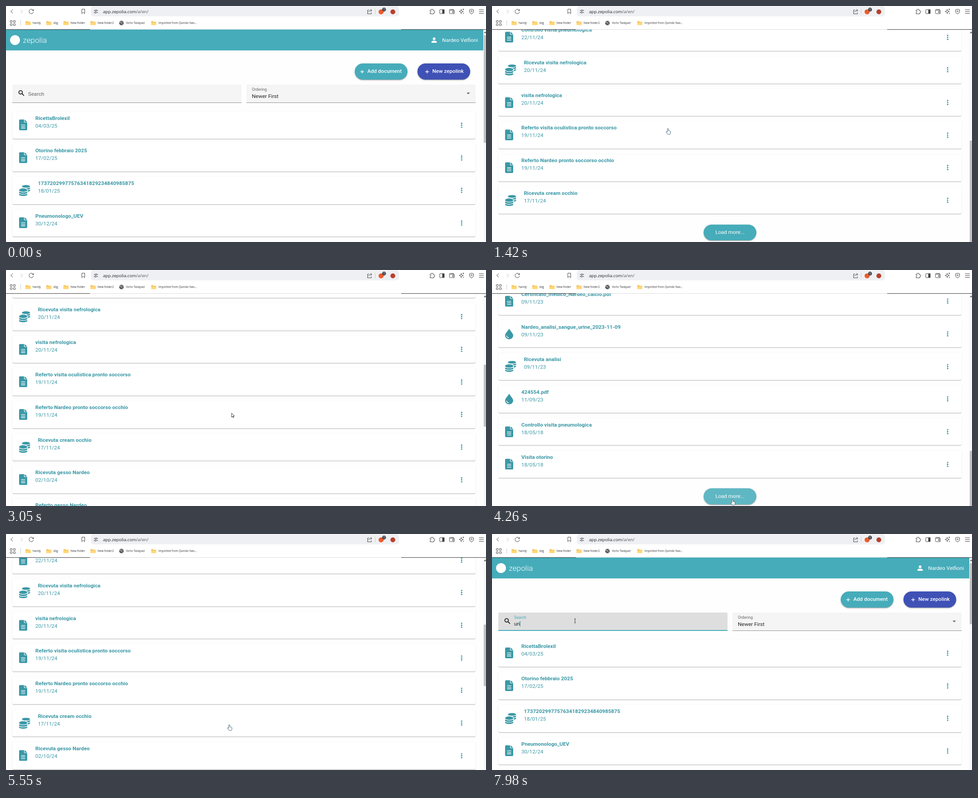
Animation, 1064 px wide and 526 px high, one loop 8000 ms. Source, as an HTML page:

```html
<!DOCTYPE html>
<html lang="en">
<head>
<meta charset="utf-8">
<style>
  html, body { margin: 0; width: 100%; height: 100%; overflow: hidden; background: #fff; }
  #stage { position: relative; width: 1064px; height: 526px; overflow: hidden; font: 11.63px/16px Roboto, sans-serif; }
  #stage * { position: absolute; box-sizing: border-box; white-space: nowrap; }
  #stage svg * { position: static; }
  #view { left: 0; top: 52px; width: 1058px; height: 474px; overflow: hidden; background: #fefefe; }
  #page { left: 0; top: -52px; width: 1058px; height: 2000px; }
  #header { top: 52px; width: 1058px; height: 47px; background: #46acba; color: #fff; }
  .card { left: 14px; width: 1027px; height: 61px; border-radius: 3px; background: #fff; color: #3b98a6;
    box-shadow: 0 1.45px .73px -.73px rgba(0,0,0,.2), 0 .73px .73px rgba(0,0,0,.14), 0 .73px 2.2px rgba(0,0,0,.12); }
  .card b { top: 6.4px; }
  .card span { top: 23.4px; }
  .card .icon { left: 14.5px; top: 18.2px; }
  .card .dots { left: 993px; top: 23.7px; }
  .pill { height: 35.5px; width: 117px; border-radius: 18px; line-height: 35.5px; background: #46acba; color: #fff; font-weight: 500;
    box-shadow: 0 2px 1.5px -1px rgba(0,0,0,.2), 0 1.5px 2px rgba(0,0,0,.14), 0 1px 4px rgba(0,0,0,.12); }
  .pill span { left: 28.5px; }
  .pill svg { left: 12px; top: 13.5px; }
  .field { top: 175px; width: 507.5px; height: 40.5px; border-radius: 3px 3px 0 0; background: #f5f5f5; border-bottom: 1px solid #8c8c8c; color: #222; }
  .small { font-size: 8.72px; color: #666; }
  #caret { width: 1px; height: 12px; top: 18.5px; background: #3b98a6; }
  #thumb { left: 1059px; width: 5px; background: #c1c1c1; }
</style>
</head>
<body>
<div id="stage">
  <div id="view"><div id="page">
    <div id="header">
      <svg width="30" height="30" style="left:5px;top:9px"><circle cx="15" cy="15" r="11" fill="#fff"/></svg>
      <span style="left:37.5px;top:14px;font-size:17.2px;line-height:20px;font-weight:300">zepolia</span>
      <svg width="14" height="14" style="left:942px;top:17px" fill="#fff"><circle cx="7" cy="4" r="3"/><path d="M1 13V11.2Q1.5 8.2 7 8.2T13 11.2V13Z"/></svg>
      <span style="right:12px;top:16px">Nardeo Velfioni</span>
    </div>
    <div class="pill" style="left:772.5px;top:128px"><svg width="9" height="9"><path d="M4.5 .5V8.5M.5 4.5H8.5" stroke="#fff" stroke-width="1.3"/></svg><span>Add document</span></div>
    <div class="pill" style="left:912px;top:128px;background:#3f51b5"><svg width="9" height="9" style="left:16.5px"><path d="M4.5 .5V8.5M.5 4.5H8.5" stroke="#fff" stroke-width="1.3"/></svg><span style="left:33px">New zepolink</span></div>
    <div class="field" id="search" style="left:14px">
      <svg width="16" height="16" style="left:13px;top:12px" fill="none" stroke="#111" stroke-width="1.7"><circle cx="5.4" cy="5.4" r="3.9"/><path d="M8.2 8.2 13 13"/></svg>
      <span id="label" style="left:35px">Search</span>
      <span id="typed" style="left:35px;top:17px"></span>
      <i id="caret"></i>
    </div>
    <div class="field" style="left:533px">
      <span class="small" style="left:12px;top:3px">Ordering</span>
      <span style="left:12px;top:18px">Newer First</span>
      <svg width="8" height="5" style="left:488px;top:18px"><path d="M0 0H7.4L3.7 3.8Z" fill="#666"/></svg>
    </div>
    <div id="rows"></div>
    <div class="pill" id="more" style="left:469px;text-align:center;font-weight:400">Load more...</div>
  </div></div>
  <div style="left:1058px;top:52px;width:6px;height:474px;background:#f8f8f8"></div>
  <svg width="6" height="6" style="left:1059px;top:56px"><path d="M0 4.5 3 1 6 4.5Z" fill="#666"/></svg>
  <div id="thumb"></div>
  <svg id="chrome" width="1064" height="53" fill="none" stroke="#444" stroke-width="1" style="left:0;top:0"></svg>
  <svg id="cursor" width="24" height="24" viewBox="-8 -4 24 24" style="left:-8px;top:-4px"><path id="pointer" stroke-width=".9"/></svg>
</div>
<script>
const $ = id => document.getElementById(id);

// Browser bars
const folder = x => `<path d="M${x - 5.5} 34h4l1.3 1.3h5.7v7h-11z" fill="#f5bd45" stroke="none"/><path d="M${x - 5.5} 36.5h11v5.8h-11z" fill="#ffd778" stroke="none"/>`;
const bookmarks = [[59, 'handy'], [105, 'sbg'], [143, 'New folder'], [203, 'New folder2'], [266, 'Vorlo Taskpad'], [338, 'Imported from Quindo Nav...']];
const grid = [[10, 33], [17, 33], [10, 40], [17, 40]];
$('chrome').innerHTML = `
  <path d="M0 0H1064V52H0Z" fill="#fff" stroke="none"/>
  <rect x="188" y="1" width="683" height="22" rx="5" fill="#eff0f3" stroke="none"/>
  <path d="M15 8 10.5 12.2 15 16.4"/><path d="M32.5 8 37 12.2 32.5 16.4" stroke="#bbb"/>
  <path d="M60.6 10A5 5 0 1 0 61 13.2M61 7V10.4H57.6M168 7H174.5V17L171.2 14.2 168 17Z"/>
  <path d="M194.5 10H198M201.5 10H204M194.5 14.5H196.5M200 14.5H204"/><circle cx="199.7" cy="10" r="1.6"/><circle cx="198.2" cy="14.5" r="1.6"/>
  <path d="M805 9H801.5V17.5H810V14.5M804 14Q804.5 9.8 810.5 9.8M808 7 811 9.8 808 12.6"/><path d="M818.5 6V18" stroke="#ccc"/>
  <g stroke="none"><circle cx="831.5" cy="13" r="5.6" fill="#f05a28"/><circle cx="838" cy="8" r="4.4" fill="#4a4e57"/><circle cx="857.5" cy="13" r="5.4" fill="#b8402f"/></g>
  <path d="M940 9H943Q942.5 6.8 944.3 6.8T945.6 9H948.5V11.5Q950.5 11.2 950.5 13T948.5 14.6V17.5H940V14.8Q942 14.6 942 13.1T940 11.5Z"/>
  <rect x="961.5" y="8" width="10" height="9" rx="1"/><path d="M967.5 8.5H971.5V16.5H967.5Z" fill="#444"/>
  <path d="M992 9V7.5H984.5Q983 7.5 983 9V15.5Q983 17 984.5 17H993.5V9.5H984M993.5 11.8H989.5V14.5H993.5"/>
  <path d="M1009 7.5 1010.3 11 1014 12.2 1010.3 13.5 1009 17 1007.7 13.5 1004.5 12.2 1007.7 11ZM1013.5 6V9M1012 7.5H1015M1014 15V18"/>
  <path d="M1032 7 1036.5 8.5V12Q1036.5 16 1032 18 1027.5 16 1027.5 12V8.5ZM1029.5 11.5Q1032 9.5 1034.5 11.5M1030.7 13.2Q1032 12.2 1033.3 13.2"/>
  <path d="M1048.5 8.5H1059M1048.5 12.5H1059M1048.5 16.5H1059"/>
  ${grid.map(([x, y]) => `<rect x="${x - .5}" y="${y - .5}" width="4" height="4" rx=".6"/>`).join('')}
  <path d="M32.5 32V44" stroke="#ccc"/>
  ${[49, 95, 133, 193, 327.5].map(folder).join('')}
  <circle cx="256" cy="38" r="5" fill="#4b4e55" stroke="none"/><path d="M252 36.5 255 35.5 256 38 254.5 40M257.5 35 260 36.5M257 41 259.5 39" stroke="#fff"/>
  <path d="M0 52.4H186M876 52.4H1064" stroke="#333"/><path d="M186 52.4H876" stroke="#c4cbd0" stroke-width=".7"/>
  <g stroke="none" fill="#333" font-family="Open Sans, sans-serif" font-size="6.3">
    <text x="215" y="15.6" font-size="9.65" fill="#222">app.zepolia.com<tspan fill="#555">/a/en/</tspan></text>
    <text x="838" y="10.3" text-anchor="middle" fill="#fff">1</text>
    ${bookmarks.map(([x, name]) => `<text x="${x}" y="40">${name}</text>`).join('')}
  </g>`;

// Document list
const disc = (x, y) => `<path d="M${x - 9.1} ${y - 2}v2a9.1 3 0 0 0 18.2 0v-2z"/>`;
const lid = (x, y, ry) => `<ellipse cx="${x}" cy="${y}" rx="9.1" ry="${ry}"/>`;
const icons = {
  doc: `<path d="M2.2 0H11V5.2Q11 6.6 12.4 6.6H18V21.8Q18 24 15.8 24H2.2Q0 24 0 21.8V2.2Q0 0 2.2 0ZM12.2 0 18 5.6H12.2Z"/><path d="M4.5 12.2H13.5M4.5 15.6H13.5M4.5 19H13.5" stroke="#fff" stroke-width="1.3"/>`,
  coins: `<g stroke="#fff" stroke-width="2.6" paint-order="stroke">${disc(15.3, 12.2) + disc(15.3, 7.6) + lid(15.3, 3, 3) + disc(9.1, 21.4) + disc(9.1, 16.8) + lid(9.1, 11.4, 3.8)}</g>`,
  drop: `<path d="M9 0C11 5 18 10.5 18 15.5A9 8.5 0 0 1 0 15.5C0 10.5 7 5 9 0Z"/><path d="M3.2 15.5Q3.6 20 8.5 20.5" fill="none" stroke="#fff" stroke-width="1.3"/>`
};
const docs = `RicettaBrolexil|04/03/25
Otorino febbraio 2025|17/02/25
17372029977576341829234840985875|18/01/25|coins
Pneumonologo_UEV|30/12/24
Controllo visita pneumologica|22/11/24
Ricevuta visita nefrologica|20/11/24|coins
visita nefrologica|20/11/24
Referto visita oculistica pronto soccorso|19/11/24
Referto Nardeo pronto soccorso occhio|19/11/24
Ricevuta cream occhio|17/11/24|coins
Ricevuta gesso Nardeo|02/10/24
Referto gesso Nardeo|02/10/24
Referto radiografia polso|28/09/24
Ricevuta visita ortopedica|28/09/24|coins
Certificato_medico_Nardeo_calcio.pdf|09/11/23
Nardeo_analisi_sangue_urine_2023-11-09|09/11/23|drop
Ricevuta analisi|09/11/23|coins
424554.pdf|11/09/23|drop
Controllo visita pneumologica|18/05/18
Visita otorino|18/05/18
Rapporto crescita Nardeo|18/05/18`.split('\n').map(line => line.split('|'));
const pitch = 72.67, firstTop = 235.3;
$('rows').innerHTML = docs.map(([title, date, kind = 'doc'], i) => {
  const left = kind === 'coins' ? 56.7 : 51;
  return `<div class="card" style="top:${firstTop + i * pitch}px">
    <svg class="icon" width="26" height="25" fill="#3b98a6">${icons[kind]}</svg>
    <b style="left:${left}px">${title}</b><span style="left:${left}px">${date}</span>
    <svg class="dots" width="6" height="14" fill="#3b98a6"><circle cx="3" cy="2.4" r="1.6"/><circle cx="3" cy="6.7" r="1.6"/><circle cx="3" cy="11" r="1.6"/></svg></div>`;
}).join('');
const cards = [...$('rows').children];

// Motion: each key is [time, ...values], eased between neighbours
const ease = p => p < .5 ? 2 * p * p : 1 - 2 * (1 - p) ** 2;
function track(keys, t) {
  const next = keys.findIndex(k => k[0] > t);
  if (next === 0) return keys[0].slice(1);
  if (next < 0) return keys.at(-1).slice(1);
  const a = keys[next - 1], b = keys[next], p = ease((t - a[0]) / (b[0] - a[0]));
  return a.slice(1).map((v, i) => v + (b[i + 1] - v) * p);
}
const hold = t => Math.floor((t - 58) / 69.5) * 69.5 + 58;

const scrollEnd = { 10: 486.7, 20: 1213.4, 21: 1227 };
const scrollKeys = [[1010, 0], [1370, 486.7], [2978, 486.7], [3400, 1213.4], [4800, 1213.4], [5020, 1227], [5220, 1227], [5818, 0]];
const mouseKeys = [[180, 964, 503], [620, 290, 240], [900, 390, 273], [1450, 390, 273], [1800, 505, 347], [2350, 530, 508], [2640, 530, 508],
  [2950, 500, 319], [3420, 500, 319], [3520, 500, 359], [4000, 533, 511], [4400, 533, 511], [4800, 497, 425], [5220, 497, 425], [5540, 495, 425],
  [6000, 480, 412], [6420, 184, 188]];
const pointers = {
  hand: 'M-1.2 .8Q0-.6 1.2 .8V4.8L4.8 5.7Q6.2 6.1 6 7.7L5.3 11.5Q5 13 3.7 13H.6Q-.4 13-1 12L-3.8 8Q-4.2 6.4-2.8 6.6L-1.2 8Z',
  arrow: 'M0 0V9L2.2 7 3.7 10.2 5 9.6 3.6 6.6 6.3 6.4Z',
  beam: 'M-1.5 1H1.5M0 1V10M-1.5 10H1.5'
};

function draw(t) {
  const count = t < 2640 ? 10 : t < 4330 ? 20 : 21;
  const [scroll] = track(scrollKeys, hold(t)), [x, y] = track(mouseKeys, hold(t));
  $('page').style.transform = `translateY(${-scroll}px)`;
  cards.forEach((card, i) => card.style.display = i < count ? '' : 'none');

  const total = scrollEnd[count] + 495;
  $('thumb').style.top = 64.5 + 476 * scroll / total + 'px';
  $('thumb').style.height = 476 * 495 / total + 'px';

  const more = $('more').style;
  more.display = count < 21 ? '' : 'none';
  more.top = 319.6 + (count - 1) * pitch + 'px';
  more.background = y > 484 && t > 1400 ? '#5fb7c3' : '#46acba';

  const focused = t >= 6580, over = t > 6000 && y < 215;
  const p = ease(Math.min(1, Math.max(0, (t - 6580) / 150)));
  const field = $('search').style, label = $('label').style;
  field.background = focused ? '#dedede' : over ? '#ececec' : '#f5f5f5';
  field.borderBottom = focused ? '2px solid #46acba' : '1px solid #8c8c8c';
  label.top = 12.5 - 9.5 * p + 'px';
  label.fontSize = 11.63 - 2.91 * p + 'px';
  label.color = focused ? '#46acba' : '#666';

  const typed = $('typed');
  typed.textContent = 'uri'.slice(0, t < 7650 ? 0 : t < 7920 ? 1 : t < 7980 ? 2 : 3);
  $('caret').style.left = 35 + typed.offsetWidth - (typed.offsetWidth ? .5 : 0) + 'px';
  $('caret').style.display = (t >= 6700 && t < 7200) || t >= 7650 ? '' : 'none';

  const kind = over ? 'beam' : t >= 2640 && t < 3450 ? 'arrow' : 'hand';
  $('cursor').style.display = t < 180 ? 'none' : '';
  $('cursor').style.transform = `translate(${x}px,${y}px)`;
  $('pointer').setAttribute('d', pointers[kind]);
  $('pointer').setAttribute('fill', kind === 'beam' ? 'none' : '#fff');
  $('pointer').setAttribute('stroke', kind === 'hand' ? '#34566b' : '#222');
}

function tick() {
  draw(performance.now() % 8000);
  requestAnimationFrame(tick);
}
tick();
</script>
</body>
</html>
```
